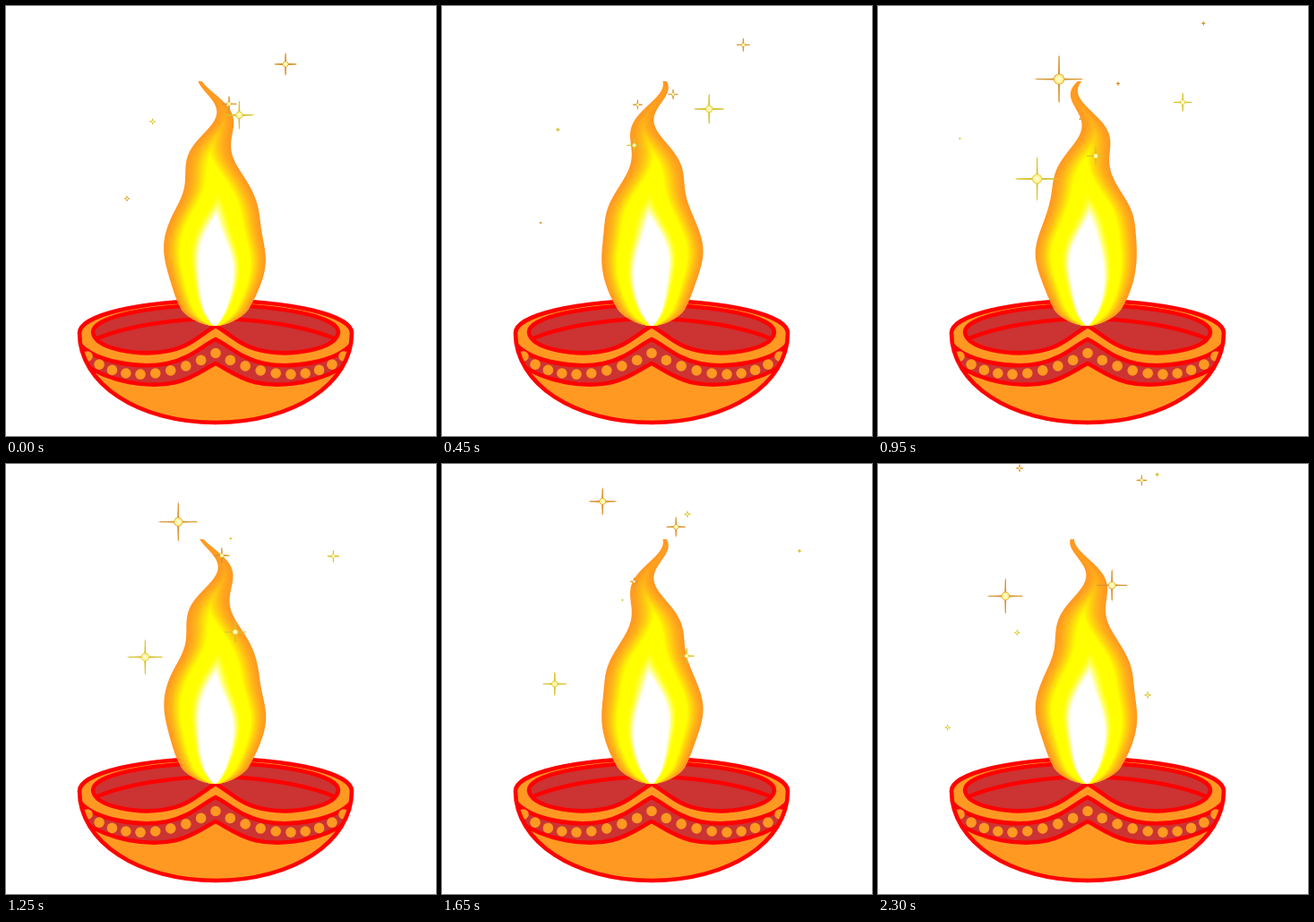
Write an HTML page with a canvas that moves like this. It is 480 px wide and 480 px high and loops after 2.35 s.

```html
<!DOCTYPE html>
<html lang="en">
<head>
<meta charset="utf-8">
<title>Diya</title>
<style>
html, body { margin: 0; width: 100%; height: 100%; overflow: hidden; background: #fff; }
canvas { display: block; width: 480px; height: 480px; }
</style>
</head>
<body>
<canvas id="stage" width="480" height="480"></canvas>
<script>
const ctx = document.getElementById('stage').getContext('2d');
const LOOP = 2350, STEP = 50, SWAY = 1200, AXIS = 234;
const RED = '#f00', ORANGE = '#ff9922', CLAY = '#cc3333';
const TIP = 84, BASE = 357;

const mix = (a, b, u) => a + (b - a) * u;

function disc(x, y, r) {
  ctx.beginPath();
  ctx.arc(x, y, r, 0, 2 * Math.PI);
  ctx.fill();
}

// Lamp: left half only, mirrored about AXIS
const side = 'C82,422 148,465 234,465';
const body = new Path2D(`M234,329 A152,36 0 0 0 82,365 ${side}Z`);
const outline = new Path2D(`M234,329 A152,36 0 0 0 82,365 ${side}`);
const bowl = new Path2D('M234,357 C215,368 205,382 175,386 C150,390 99,384 97,364 A137,30 0 0 1 234,334');
const oil = new Path2D('M102,371 C140,355 200,349 234,349');
const band = new Path2D('M234,372 C218,380 205,394 180,399 C150,405 100,398 82,377 L86,399 C115,420 160,427 190,420 C210,415 222,405 234,399');

const cubic = (a, b, c, d, u) => mix(mix(mix(a, b, u), mix(b, c, u), u), mix(mix(b, c, u), mix(c, d, u), u), u);

function halfLamp() {
  ctx.strokeStyle = RED;
  ctx.lineWidth = 4.6;
  ctx.lineJoin = ctx.lineCap = 'round';
  ctx.fillStyle = ORANGE;
  ctx.fill(body);
  ctx.fillStyle = CLAY;
  ctx.fill(bowl);
  ctx.stroke(bowl);
  ctx.stroke(oil);
  ctx.save();
  ctx.clip(body);
  ctx.fill(band);
  ctx.stroke(band);
  ctx.fillStyle = ORANGE;
  for (let i = 0; i <= 9; i++) {
    disc(cubic(234, 186, 128, 91, i / 9), cubic(387.5, 413, 423, 391, i / 9), 5.8);
  }
  ctx.restore();
  ctx.stroke(outline);
}

function lamp() {
  halfLamp();
  ctx.save();
  ctx.translate(2 * AXIS, 0);
  ctx.scale(-1, 1);
  halfLamp();
  ctx.restore();
}

// Half width of the flame every 40px from y = 80, joined by a smooth curve
const WIDTHS = [1.5, 8.5, 22.5, 36, 50.5, 56.5, 46.5, 26];

function halfWidth(y) {
  const p = (y - 80) / 40, i = Math.min(Math.floor(p), WIDTHS.length - 2), u = p - i;
  const b = WIDTHS[i], c = WIDTHS[i + 1];
  const a = WIDTHS[i - 1] ?? 2 * b - c, d = WIDTHS[i + 2] ?? 2 * c - b;
  return b + u / 2 * (c - a + u * (2 * a - 5 * b + 4 * c - d + u * (3 * (b - c) + d - a)));
}

const rows = [];
for (let y = TIP; y <= BASE; y += y < 345 ? 2 : .5) {
  rows.push({ y, half: halfWidth(y), cap: Math.sqrt(1 - (Math.max(0, y - 338) / 19) ** 2) });
}

// A wave runs up the flame and grows towards the tip
function centre(y, t) {
  const lag = (22 - 4 * (y - 120)) * Math.PI / 180;
  return 233.6 + 17.5 * Math.exp((TIP - y) / 76) * Math.cos(2 * Math.PI * t / SWAY - lag);
}

// Each contour lies inside the outline by inset + slope * height above the base
const contours = [
  { inset: 0, slope: 0, rgb: [255, 153, 34] },
  { inset: 12.5, slope: .062, rgb: [255, 255, 0] },
  { inset: 19, slope: .125, rgb: [255, 255, 0] },
  { inset: 22, slope: .215, rgb: [255, 255, 255] }
];

function flame(t) {
  const mid = rows.map(r => centre(r.y, t));
  const STEPS = 14;
  for (let k = 0; k <= 3 * STEPS; k++) {
    const i = Math.min(Math.floor(k / STEPS), 2), u = k / STEPS - i;
    const a = contours[i], b = contours[i + 1];
    const inset = mix(a.inset, b.inset, u), slope = mix(a.slope, b.slope, u);
    const left = [], right = [];
    rows.forEach((r, n) => {
      const w = (r.half - inset - slope * (BASE - r.y)) * r.cap;
      if (w < 0) return;
      left.push([mid[n] - w, r.y]);
      right.unshift([mid[n] + w, r.y]);
    });
    ctx.fillStyle = `rgb(${a.rgb.map((c, n) => mix(c, b.rgb[n], u ** 1.4))})`;
    ctx.beginPath();
    for (const [x, y] of left.concat(right)) ctx.lineTo(x, y);
    ctx.fill();
  }
}

// Sparks: birth, x, y, speed x, speed y (px per second), size
const RISE = 500, FADE = 1650;
const sparks = [
  [-1000, 258, 113, 54, -48, 20],
  [-350, 231, 127, 84, -15, 23],
  [-900, 231, 131, 20, -24, 13],
  [-900, 232, 111, -76, 20, 5],
  [-1400, 212, 131, -55, 60, 7],
  [350, 222, 148, -74, 75, 29],
  [400, 220, 113, -32.6, -57, 31],
  [600, 228, 144, 43, 67, 15],
  [940, 225, 127, 51, -80, 14],
  [1150, 245, 90, 58, -68, 4],
  [1600, 220, 130, -111, 25, 25],
  [1600, 205, 149, -71, 56, 4],
  [1850, 240, 130, 47, 12, 21]
];

function star(x, y, s, tint) {
  const w = Math.min(1.6, .5 + s * .08);
  ctx.fillStyle = tint;
  ctx.beginPath();
  for (let i = 0; i < 8; i++) {
    const a = i * Math.PI / 4, r = i % 2 ? w : s;
    ctx.lineTo(x + r * Math.cos(a), y + r * Math.sin(a));
  }
  ctx.fill();
  const arm = s * .85;
  ctx.fillRect(x - arm, y - .6, 2 * arm, 1.2);
  ctx.fillRect(x - .6, y - arm, 1.2, 2 * arm);
  if (s < 3) return;
  const r = s * .18 + .7, glow = ctx.createRadialGradient(x, y, 0, x, y, r);
  glow.addColorStop(0, '#fffff0');
  glow.addColorStop(.75, '#fff080');
  glow.addColorStop(1, tint);
  ctx.fillStyle = glow;
  disc(x, y, r);
}

function sparkle(t) {
  sparks.forEach(([birth, x, y, vx, vy, peak], i) => {
    const age = t - birth;
    if (age <= 0 || age >= RISE + FADE) return;
    const size = peak * (age < RISE ? (age / RISE) ** .7 : 1 - (age - RISE) / FADE);
    const tint = `hsl(${i % 2 ? 52 : 36},68%,52%)`;
    star(x + vx * age / 1000, y + vy * age / 1000, Math.max(size, 1), tint);
  });
}

function draw() {
  const t = Math.floor(performance.now() % LOOP / STEP) * STEP;
  ctx.fillStyle = '#fff';
  ctx.fillRect(0, 0, 480, 480);
  lamp();
  flame(t);
  sparkle(t);
  requestAnimationFrame(draw);
}
draw();
</script>
</body>
</html>
```
